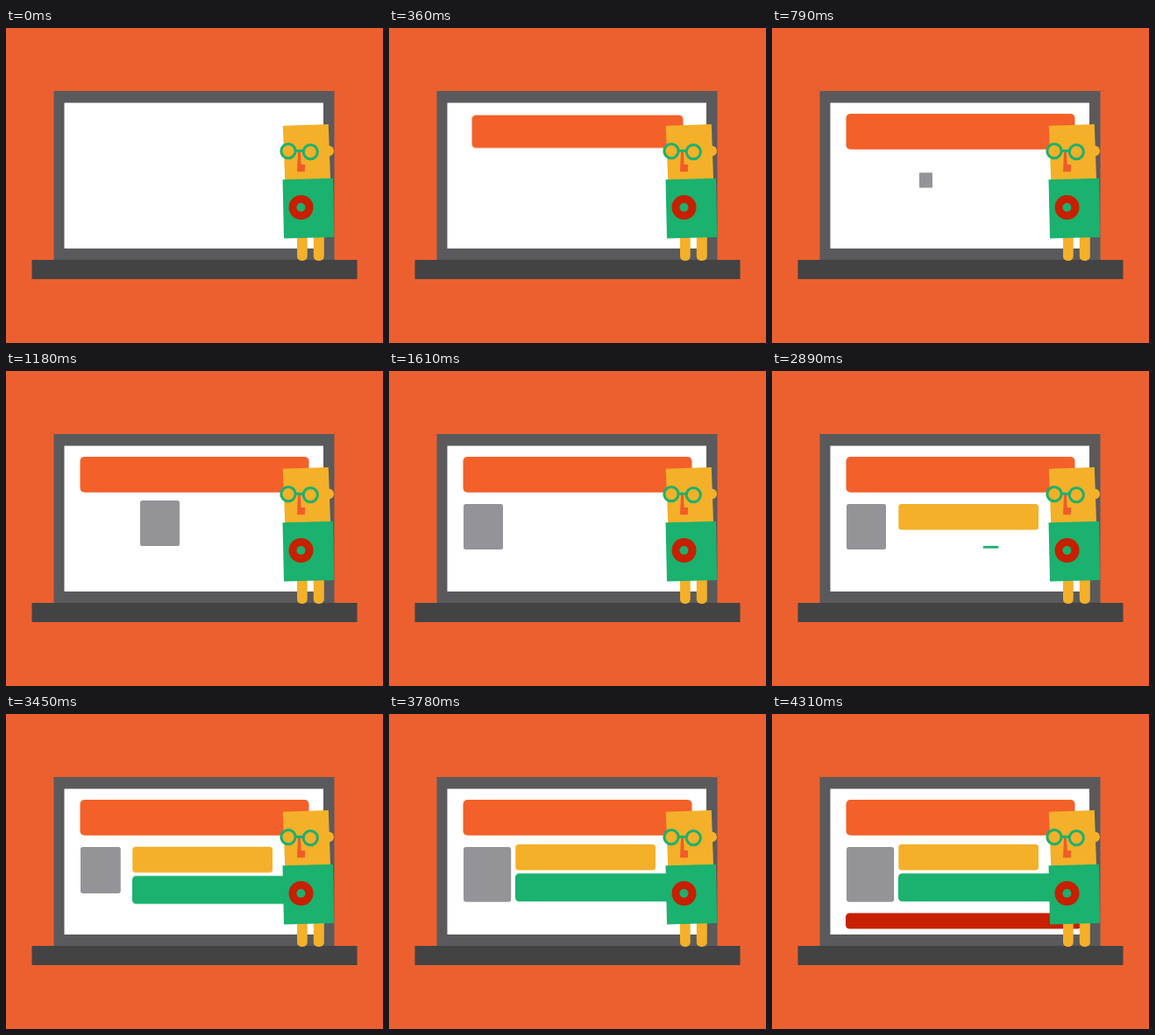
Recreate the animation shown at these times as an HTML page. Size 430 by 360 pixels, loop 4680 ms.

```html
<!DOCTYPE html>
<html lang="en">
<head>
<meta charset="utf-8">
<title>Building a page</title>
<style>
  html, body { margin: 0; width: 100%; height: 100%; overflow: hidden; background: #ec602f; }
  svg { display: block; width: 100vw; height: 100vh; }

  .part { animation: 4680ms linear infinite; }
  .bar { transform-box: fill-box; transform-origin: center; }

  .header { animation-name: header; }
  .photo  { animation-name: photo; }
  .title  { animation-name: title; }
  .text   { animation-name: text; }
  .rows   { animation-name: rows; }
  .footer { animation-name: footer; }
  .person { animation-name: jump; }

  /* Bars grow from their centre at about 30 ms per step. */
  @keyframes header {
    0%, .63% { transform: scale(0); animation-timing-function: steps(13, start); }
    8.96%, 100% { transform: scale(1); }
  }
  @keyframes title {
    0%, 45.715% { transform: scale(0); animation-timing-function: steps(14, start); }
    54.69%, 100% { transform: scale(1); }
  }
  @keyframes text {
    0%, 61.74% { transform: scale(0); animation-timing-function: steps(12, start); }
    69.43%, 100% { transform: scale(1); }
  }
  @keyframes footer {
    0%, 86.315% { transform: scale(0); animation-timing-function: steps(10, start); }
    92.725%, 100% { transform: scale(1); }
  }

  /* Pops up, slides left, then enlarges from its corner. */
  @keyframes photo {
    0%, 14.945% { transform: translate(175.5px, 174px) scale(0); animation-timing-function: steps(12, start); }
    22.64% { transform: translate(153px, 148px) scale(1); }
    27.34% { transform: translate(153px, 148px) scale(1); animation-timing-function: steps(12, start); }
    35.03% { transform: translate(85px, 152px) scale(1); }
    73.71% { transform: translate(85px, 152px) scale(1); animation-timing-function: steps(12, start); }
    81.4%, 100% { transform: translate(85px, 152px) scale(1.205); }
  }
  @keyframes rows {
    0%, 73.71% { transform: translateY(0); animation-timing-function: steps(12, start); }
    81.4%, 100% { transform: translateY(-3px); }
  }
  @keyframes jump {
    0%, 10.256%, 21.368% { transform: translateY(0); animation-timing-function: ease-out; }
    12.393%, 23.291% { transform: translateY(-12.6px); animation-timing-function: ease-in; }
    14.316%, 25%, 100% { transform: translateY(0); animation-timing-function: ease-out; }
  }
</style>
</head>
<body>
<svg viewBox="0 0 430 360">
  <rect width="430" height="360" fill="#ec602f"/>

  <!-- laptop -->
  <path d="M54.5 72h320v194h-320z" fill="#5a5a5c"/>
  <path d="M66.5 85.5H362V252H66.5z" fill="#fff"/>
  <path d="M29.5 265h371v22h-371z" fill="#434344"/>

  <!-- page -->
  <rect class="part bar header" x="84.5" y="98" width="261" height="40.7" rx="5" fill="#f36029"/>
  <rect class="part photo" width="45" height="52" rx="2.5" fill="#939398"/>
  <g class="part rows">
    <rect class="part bar title" x="144.3" y="152" width="159.7" height="29.5" rx="3.5" fill="#f4b029"/>
    <rect class="part bar text" x="144" y="185.3" width="211" height="31.9" rx="4.5" fill="#1bb16f"/>
  </g>
  <rect class="part bar footer" x="84" y="227.4" width="269" height="18.2" rx="4.5" fill="#c62000"/>

  <!-- character -->
  <g class="part person">
    <g fill="#f4b029">
      <rect x="332" y="230" width="11.7" height="36" rx="5"/>
      <rect x="350.8" y="230" width="12" height="36" rx="5"/>
      <circle cx="368" cy="140.5" r="6"/>
      <circle cx="318.5" cy="142" r="6"/>
      <path d="M315.8 111.8L367.8 110L370 172.5L318.2 174z"/>
    </g>
    <path d="M315.5 173.3L373 171.8L374.2 239L317 240.6z" fill="#1bb16f"/>
    <path d="M333 141h2.8l.8 15h4.6l-.4 8.2H332z" fill="#f15b29"/>
    <g fill="none" stroke="#1bb16f" stroke-width="3">
      <circle cx="322" cy="140.6" r="8.1"/>
      <circle cx="347.3" cy="141.6" r="8.1"/>
      <path d="M330 140.3l9.4.3"/>
    </g>
    <circle cx="336.5" cy="205" r="14" fill="#c62000"/>
    <circle cx="336.4" cy="205" r="5" fill="#1bb16f"/>
  </g>
</svg>
</body>
</html>
```
